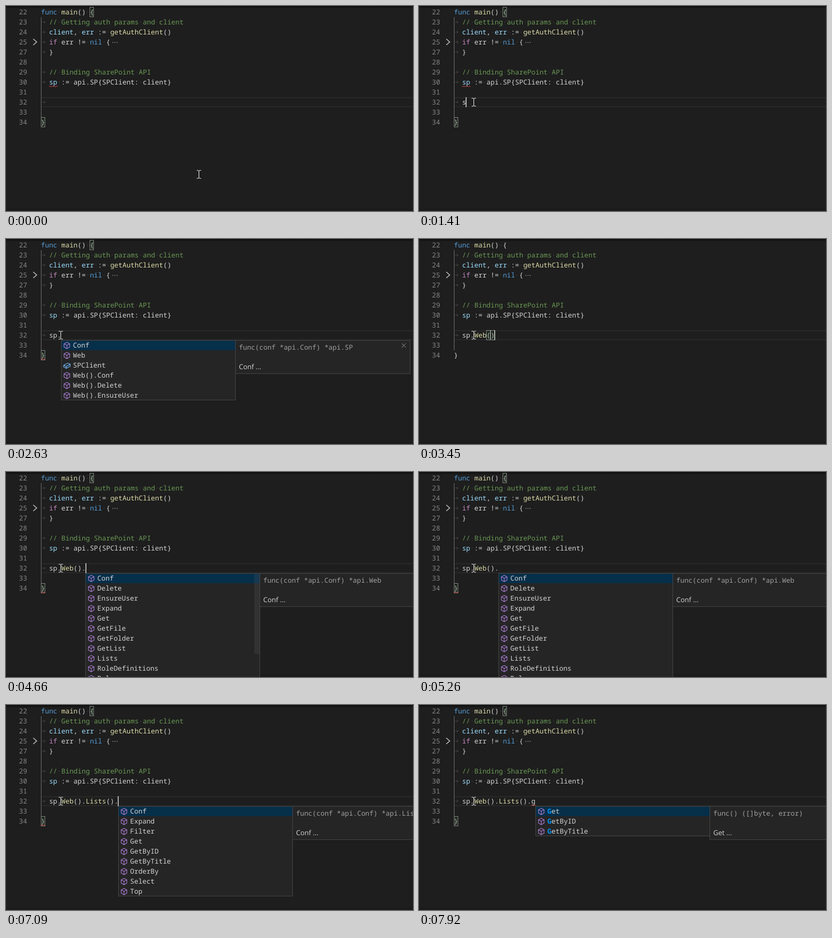
Animation of 769x389 px, one loop 8000 ms. Source, as an HTML page:

```html
<!DOCTYPE html>
<html lang="en">
<head>
<meta charset="utf-8">
<title>Go code completion</title>
<style>
  html, body { margin: 0; width: 100%; height: 100%; overflow: hidden; background: #1e1e1e; }
  svg { display: block; }
  text {
    font-family: "Noto Sans Mono", "DejaVu Sans Mono", monospace;
    font-size: 12.833px;
    font-variant-ligatures: none;
    text-rendering: geometricPrecision;
    white-space: pre;
  }
  .doc { font-family: "Open Sans", "Noto Sans", sans-serif; font-size: 13px; }
</style>
</head>
<body>
<svg width="769" height="389" viewBox="0 0 769 389">
  <defs>
    <linearGradient id="shade" x2="0" y2="1">
      <stop stop-color="#000" stop-opacity=".6"/>
      <stop offset="1" stop-color="#000" stop-opacity="0"/>
    </linearGradient>
  </defs>
  <g id="page"></g>
  <g id="live"></g>
</svg>
<script>
(() => {
const LOOP = 8000, CH = 7.7, ROW = 19, LEFT = 66, TAB = LEFT + 2 * CH, LINE = 9;
const C = {
  text: '#d4d4d4', key: '#569cd6', fn: '#dcdcaa', rem: '#6a9955', flow: '#c586c0',
  name: '#9cdcfe', num: '#858585', faint: '#424242', hit: '#0097fb', error: '#f14c4c',
  edge: '#454545', panel: '#252526', pick: '#062f4a', method: '#b180d7', field: '#75beff'
};

const rowTop = row => 2 + row * ROW;
const esc = s => s.replace(/&/g, '&amp;').replace(/</g, '&lt;');
const rect = (x, y, w, h, fill, extra = '') =>
  `<rect x="${x}" y="${y}" width="${w}" height="${h}" fill="${fill}" ${extra}/>`;
const path = (d, stroke, extra = '') =>
  `<path d="${d}" fill="none" stroke="${stroke}" ${extra}/>`;
const span = (fill, s) => `<tspan fill="${fill}">${esc(s)}</tspan>`;
const text = (x, y, body, extra = '') => `<text x="${x}" y="${y}" ${extra}>${body}</text>`;

// Tokens are [colour, string]; spaces show as faint dots.
function code(x, row, tokens) {
  const body = tokens.map(([fill, s]) =>
    s.split(/( )/).filter(Boolean).map(p => p === ' ' ? span(C.faint, '·') : span(fill, p)).join('')
  ).join('');
  return text(x, rowTop(row) + 14, body);
}

const tabMark = row => {
  const y = rowTop(row) + 10;
  return path(`M68 ${y - .5}H74M71.5 ${y - 3}L74 ${y - .5}L71.5 ${y + 2}`, C.faint);
};

const bracket = (x, row) =>
  rect(Math.floor(x) + .5, rowTop(row) + .5, 7, ROW - 1, '#006400', 'fill-opacity=".1" stroke="#888"');

function squiggle(x, row, chars) {
  const y = rowTop(row) + 18.5, n = Math.round(chars * CH / 2);
  let d = `M${x} ${y}`;
  for (let i = 1; i <= n; i++) d += `L${x + i * 2} ${y - (i % 2) * 2}`;
  return path(d, C.error);
}

function drawPage() {
  const nums = [22, 23, 24, 25, 27, 28, 29, 30, 31, 32, 33, 34];
  let s = rect(0, 0, 769, 389, '#1e1e1e') + rect(0, 384, 769, 5, '#1b1b1b');
  s += rect(0, 0, 769, 5, 'url(#shade)');
  s += rect(LEFT, rowTop(LINE), 703, 2, '#282828') + rect(LEFT, rowTop(LINE) + 17, 703, 2, '#282828');
  s += nums.map((n, i) => text(24.6, rowTop(i) + 14, n, `fill="${C.num}"`)).join('');
  s += rect(LEFT, rowTop(1), 1, 10 * ROW, '#707070');
  s += [1, 2, 3, 4, 6, 7].map(tabMark).join('');
  s += code(LEFT, 0, [[C.key, 'func '], [C.fn, 'main'], [C.text, '() {']]);
  s += code(TAB, 1, [[C.rem, '// Getting auth params and client']]);
  s += code(TAB, 2, [[C.name, 'client'], [C.text, ', '], [C.name, 'err'], [C.text, ' := '],
    [C.fn, 'getAuthClient'], [C.text, '()']]);
  s += code(TAB, 3, [[C.flow, 'if'], [C.text, ' err != '], [C.key, 'nil'], [C.text, ' {']]);
  s += [202, 206, 210].map(x => rect(x - .8, 68.3, 1.6, 1.6, '#8a8a8a')).join('');
  s += path('M51.5 62.5L58 68.3L51.5 74', '#c5c5c5', 'stroke-width="1.5"');
  s += code(TAB, 4, [[C.text, '}']]);
  s += code(TAB, 6, [[C.rem, '// Binding SharePoint API']]);
  s += code(TAB, 7, [[C.name, 'sp'], [C.text, ' := api.SP{SPClient: client}']]);
  s += code(LEFT, 11, [[C.text, '}']]);
  return s;
}

// Completion lists; "~" marks a field icon, "*" precedes a matched letter.
const words = s => s.split(' ');
const lists = {
  s: words('~*sp ~*select ~*string ~*struct ~*switch ~api.*SP ~o*s ~con*st ~cla*s ~u*se ~pa*s ~ca*se'),
  sp: words('~*s*p'),
  api: words('Conf Web ~SPClient Web().Conf Web().Delete Web().EnsureUser'),
  web: words('Conf Delete EnsureUser Expand Get GetFile GetFolder GetList Lists RoleDefinitions Roles Select'),
  l: words('*Lists *Lists().Conf *Lists().Expand *Lists().Filter Get*List'),
  all: words('Conf Expand Filter Get GetByID GetByTitle OrderBy Select Top'),
  g: words('*Get *GetByID *GetByTitle')
};

// "t" is when a step shows, "at" when its caret last began to blink.
const steps = [
  { t: 0, at: -800, src: '', unused: 1 },
  { t: 1410, src: 's', unused: 1 },
  { t: 1620, at: 1410, src: 's', list: 's', sig: 'var sp *api.SP' },
  { t: 1810, at: 1830, src: 'sp', list: 'sp', sig: 'var sp *api.SP' },
  { t: 2230, src: 'sp.', list: 'api', sig: 'func(conf *api.Conf) *api.SP', doc: 'Conf', open: 1 },
  { t: 3030, at: 2230, src: 'sp.', list: 'api', pick: 1, sig: 'func() *api.Web', doc: 'Web', open: 1 },
  { t: 3450, src: 'sp.Web()', pair: 1 },
  { t: 4460, src: 'sp.Web().', list: 'web', sig: 'func(conf *api.Conf) *api.Web', doc: 'Conf', open: 1, bar: 1 },
  { t: 5470, src: 'sp.Web().l', list: 'l', sig: 'func() *api.Lists', doc: 'Lists', bad: 1 },
  { t: 6080, src: 'sp.Web().Lists()', pair: 1 },
  { t: 7090, src: 'sp.Web().Lists().', list: 'all', sig: 'func(conf *api.Conf) *api.Lists', doc: 'Conf', open: 1 },
  { t: 7510, src: 'sp.Web().Lists().g', list: 'g', sig: 'func() ([]byte, error)', doc: 'Get', bad: 1 }
];

const cube = (x, y) => path('M0-6L5.3-3.2V3L0 6L-5.3 3V-3.2ZM-5.3-3.2L0-.3L5.3-3.2M0-.3V6',
  C.method, `transform="translate(${x} ${y})" stroke-width="1.1"`);
const brick = (x, y) => path('M-6-.5L1.5-4.5L6.3-2.3V1.7L-1.2 5.3L-6 3ZM-6-.5L-1.2 1.8L6.3-2.3M-1.2 1.8V5.3',
  C.field, `transform="translate(${x} ${y})" stroke-width="1.1"`);

function label(item) {
  return item.split(/(\*.)/).filter(Boolean).map(p =>
    p[0] === '*' ? `<tspan fill="${C.hit}" font-weight="700">${p[1]}</tspan>` : span(C.text, p)
  ).join('');
}

function popup(step, x, fade) {
  const items = lists[step.list], y = rowTop(LINE + 1), w = 330, h = items.length * ROW;
  let s = rect(x + .5, y + .5, w - 1, h - 1, C.panel, `stroke="${C.edge}"`);
  s += rect(x + 1, y + 1 + (step.pick || 0) * ROW, w - 2, ROW - 1, C.pick);
  items.forEach((item, i) => {
    const icon = item[0] === '~' ? brick : cube;
    s += icon(x + 11, y + 10 + i * ROW);
    s += text(x + 22.6, y + 14 + i * ROW, label(item.replace('~', '')));
  });
  if (fade > 0) s += rect(x + w - 11, y + 1, 10, 152, '#797979', `opacity="${fade * .4}"`);

  const dx = x + w;
  s += rect(dx - .5, y + .5, w, 63, C.panel, `stroke="${C.edge}"`);
  s += text(dx + 6, y + 18, esc(step.sig), 'fill="#a0a0a0"');
  if (step.doc) s += text(dx + 6, y + 55, step.doc + ' ...', `class="doc" fill="${C.text}"`);
  s += path(`M${dx + 313.5} ${y + 6}l8 8m0-8l-8 8`, '#999');
  return s;
}

const tokens = src => src.split(/(Web|Lists)/).filter(Boolean)
  .map(p => [/^(Web|Lists)$/.test(p) ? C.fn : C.text, p]);

const beam = (x, y) => path('M-3.5-7.5H-1L.5-6.5L2-7.5H4.5M.5-6.5V6.5M-3.5 7.5H-1L.5 6.5L2 7.5H4.5',
  '#fff', `transform="translate(${x} ${y})"`);

function pointer(t) {
  const n = t < 200 ? 0 : Math.min(6, 1 + Math.floor((t - 200) / 202));
  const u = n / 6, e = u * u * (3 - 2 * u);
  return beam(Math.round(364 - 261 * e), Math.round(319 - 137 * e) + .5);
}

function drawLive(t) {
  const step = steps.filter(p => p.t <= t).pop();
  const n = step.src.length, end = TAB + n * CH;
  let s = tabMark(LINE) + code(TAB, LINE, tokens(step.src));
  if (step.unused) s += squiggle(TAB, 7, 2);
  if (step.pair) s += bracket(end - 2 * CH, LINE) + bracket(end - CH, LINE);
  else s += bracket(LEFT + 12 * CH, 0) + bracket(LEFT, 11);
  if (step.open) s += squiggle(LEFT, 11, 1);
  if (step.bad) s += squiggle(end - CH, LINE, 1);
  if (step.list) {
    const tick = Math.floor((t - step.t) / 200);
    s += popup(step, Math.floor(end), step.bar ? .5 - tick * .15 : 0);
  }
  const dt = t - (step.at ?? step.t);
  if (dt < 0 || dt % 1008 < 400) s += rect(Math.floor(end - .6), rowTop(LINE), 2, ROW, '#aeafad');
  return s + pointer(t);
}

const live = document.getElementById('live');
document.getElementById('page').innerHTML = drawPage();
let last = '';
function frame() {
  const s = drawLive(performance.now() % LOOP);
  if (s !== last) live.innerHTML = last = s;
  requestAnimationFrame(frame);
}
frame();
})();
</script>
</body>
</html>
```
